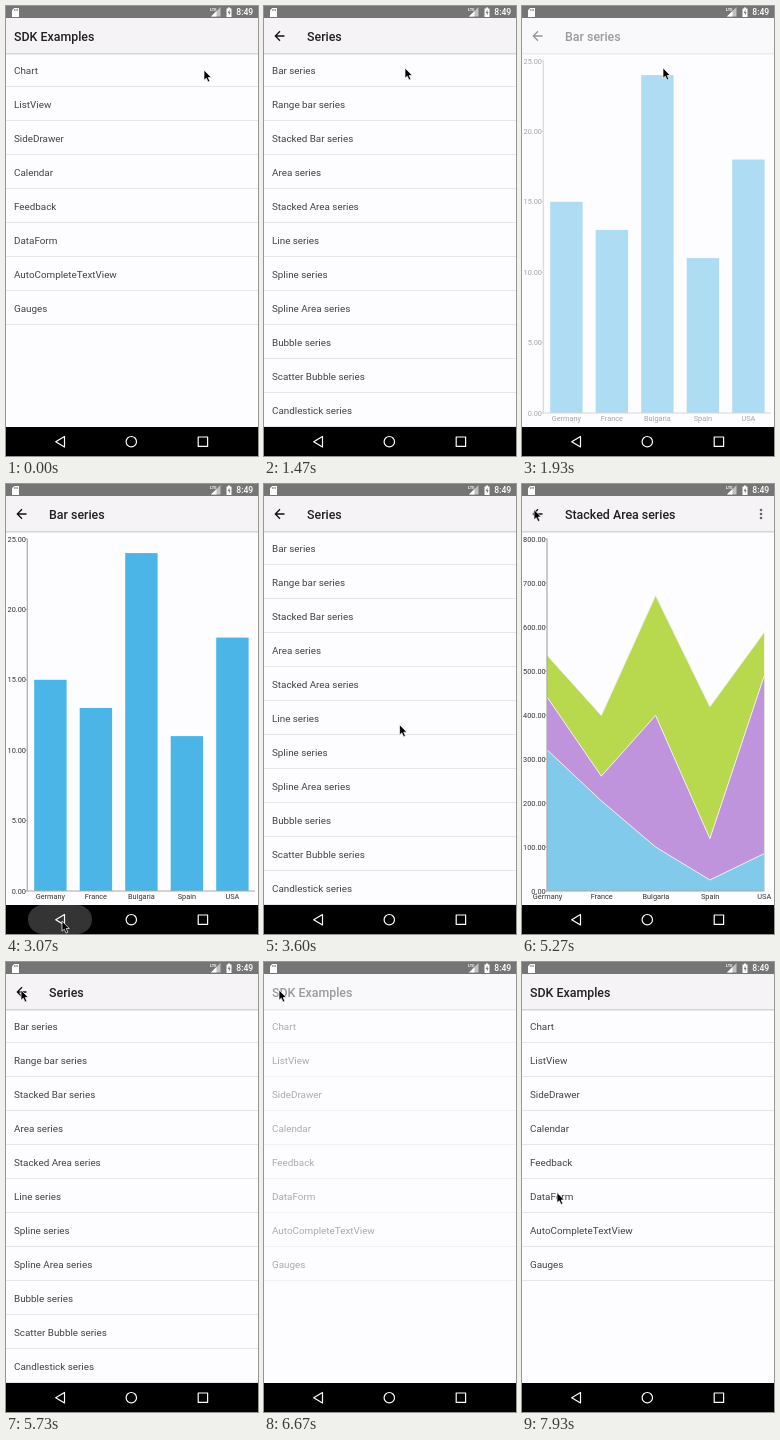
An HTML page for the animation above (8 s loop, 252 by 450 pixels).

```html
<!DOCTYPE html>
<html lang="en">
<head>
<meta charset="utf-8">
<title>SDK Examples</title>
<style>
  html, body { margin: 0; width: 100%; height: 100%; overflow: hidden; background: #fdfcfe; }
  svg { display: block; width: 252px; height: 450px; font-family: Roboto, sans-serif; }
  .title { font-size: 12.4px; font-weight: 500; fill: #212121; }
  .row { font-size: 9.85px; fill: #424242; }
  .label { font-size: 7.35px; fill: #333; }
  .clock { font-size: 8.6px; font-weight: 500; fill: #fff; }
</style>
</head>
<body>
<svg viewBox="0 0 252 450">
  <defs>
    <linearGradient id="shadow" x2="0" y2="1">
      <stop stop-color="#cbcacc"/><stop offset="1" stop-color="#fdfcfe"/>
    </linearGradient>
  </defs>
  <rect width="252" height="450" fill="#fdfcfe"/>
  <g id="pages"></g>

  <rect width="252" height="12" fill="#757575"/>
  <path d="M6 4.2L8.2 2H13V11H6Z" fill="#fff"/>
  <path d="M8.6 3v2M10 3v2M11.4 3v2" stroke="#757575" stroke-width=".7"/>
  <path d="M205 10.5H214.5V1Z" fill="#fff" opacity=".55"/>
  <path d="M205 10.5H210.5V5Z" fill="#fff"/>
  <text x="204" y="5" font-size="4" font-weight="700" fill="#fff">LTE</text>
  <path d="M220.500 2.500h1.500v-1h2v1h1.500v8.500h-5z" fill="#fff"/>
  <path d="M223.500 3.800l-1.800 3.200h1.200v2.500l1.700-3.300h-1.100z" fill="#757575"/>
  <text class="clock" x="230.300" y="9.200">8:49</text>

  <rect y="421" width="252" height="29"/>
  <rect id="ripple" x="22" y="421" width="64" height="29" rx="15" fill="#343434"/>
  <g fill="none" stroke="#fff" stroke-width="1.2" stroke-linejoin="round">
    <path d="M58.500 430.500V441L49.700 435.700Z"/>
    <circle cx="125.300" cy="435.700" r="5.200"/>
    <rect x="192.200" y="431" width="9.400" height="9.400"/>
  </g>
  <path id="cursor" d="M0 0V10.200L2.300 8.200L4 12L5.900 11.200L4.200 7.500H7.300Z" stroke="#fff" stroke-width=".7"/>
</svg>
<script>
const FRAME = 1000 / 15, FRAMES = 120;
const $ = id => document.getElementById(id);
const countries = ['Germany', 'France', 'Bulgaria', 'Spain', 'USA'];

const text = (cls, x, y, s, anchor = 'start') =>
  `<text class="${cls}" x="${x}" y="${y}" text-anchor="${anchor}">${s}</text>`;
const line = (d, color, width = 1) =>
  `<path d="${d}" fill="none" stroke="${color}" stroke-width="${width}"/>`;

const header = (title, back = true) =>
  '<rect y="12" width="252" height="35.5" fill="#f5f3f6"/>' +
  '<rect y="47" width="252" height="2.500" fill="url(#shadow)"/>' +
  text('title', back ? 43 : 8, 34.8, title) +
  (back ? line('M20.500 30H11.800M16 25.300L11.300 30L16 34.700', '#111', 1.3) : '');

const list = (title, rows, back) => header(title, back) + rows.map((row, i) =>
  text('row', 8, 67.7 + 34 * i, row) +
  line(`M0 ${80.5 + 34 * i}H252`, '#e6e5e7')).join('');

// Value axis with evenly spaced labels, and category labels below
function axes(left, right, max, step, firstX, stepX) {
  let out = line(`M${left} 54.500V407H${right}`, '#aaa', 1.2);
  for (let v = 0; v <= max; v += step) {
    const y = 407 - 352 * v / max;
    out += line(`M${left - 2} ${y}H${left}`, '#aaa') +
      text('label', left - 1.3, y + 2.6, v.toFixed(2), 'end');
  }
  return out + countries.map((c, i) =>
    text('label', firstX + i * stepX, 414.6, c, 'middle')).join('');
}

function barChart() {
  const bars = [15, 13, 24, 11, 18].map((v, i) =>
    `<rect x="${28.2 + 45.5 * i}" y="${407 - v * 14.08}" width="32.400" height="${v * 14.08}" fill="#4bb5e7"/>`);
  return header('Bar series') + bars.join('') + axes(21.3, 249, 25, 5, 44.4, 45.5);
}

function areaChart() {
  const layers = [
    ['#b8d84d', [536, 399, 672, 419, 588]],
    ['#c093dd', [441, 261, 399, 119, 489]],
    ['#82caec', [321, 205, 100, 25, 85]]
  ];
  const areas = layers.map(([color, values]) => {
    const top = values.map((v, i) => `${25 + 54.3 * i} ${407 - v * 0.44}`).join('L');
    return `<path d="M${top}V407H25Z" fill="${color}"/>` + line('M' + top, '#f4f1f6');
  });
  const dots = [26, 30, 34].map(y => `<circle cx="239" cy="${y}" r="1.300" fill="#666"/>`);
  return header('Stacked Area series') + dots.join('') + areas.join('') +
    axes(25, 242.5, 800, 100, 25.5, 54.2);
}

const pages = {
  home: list('SDK Examples', ['Chart', 'ListView', 'SideDrawer', 'Calendar', 'Feedback',
    'DataForm', 'AutoCompleteTextView', 'Gauges'], false),
  chart: list('Chart', ['Series', 'Axes', 'Interaction', 'Annotations', 'Legend', 'Grid', 'Styling']),
  series: list('Series', ['Bar', 'Range bar', 'Stacked Bar', 'Area', 'Stacked Area', 'Line', 'Spline',
    'Spline Area', 'Bubble', 'Scatter Bubble', 'Candlestick'].map(s => s + ' series')),
  bar: barChart(),
  area: areaChart()
};
$('pages').innerHTML = Object.entries(pages).map(([id, body]) => `<g id="${id}">${body}</g>`).join('');

// Navigation: [step, page shown from then on]
const visits = [[-9, 'home'], [6, 'chart'], [19, 'series'], [28, 'bar'], [47, 'series'],
  [62, 'area'], [83, 'series'], [91, 'chart'], [99, 'home']];
const fadeIn = [0, 0.44, 0.84, 1];

// Pointer stops: [step, x, y]
const stops = [[0, 198, 64], [1, 194, 65], [5, 194, 65], [10, 152, 62], [12, 152, 62], [15, 152, 55],
  [17, 152, 55], [22, 141, 62], [38, 141, 62], [45, 56, 437], [47, 56, 437], [51, 134, 270],
  [58, 138, 195.5], [65, 138, 195.5], [79, 12, 25.5], [82, 12, 25.5], [86, 15, 28], [104, 15, 28],
  [108, 73, 150], [112, 35, 234], [118, 35, 234], [119, 35, 230.5], [120, 35, 230.5]];

function pointer(n) {
  const i = stops.findIndex(s => s[0] > n);
  const [n0, x0, y0] = stops[i - 1], [n1, x1, y1] = stops[i];
  const u = (n - n0) / (n1 - n0), e = u * u * (3 - 2 * u);
  return [x0 + (x1 - x0) * e, y0 + (y1 - y0) * e];
}

function draw(n) {
  const i = visits.findLastIndex(v => v[0] <= n);
  const [start, page] = visits[i];
  const shown = fadeIn[Math.min(n - start, 3)];
  for (const id in pages) $(id).setAttribute('opacity', id === page ? shown : 0);
  if (n === start) $(visits[i - 1][1]).setAttribute('opacity', 0.5);

  const ripple = n < 45 ? 0 : n < 47 ? 1 : Math.max(0, 1 - (n - 46) / 4);
  $('ripple').setAttribute('opacity', ripple);
  $('cursor').setAttribute('transform', `translate(${pointer(n)})`);
}

const begin = performance.now();
function tick() {
  const t = Math.max(0, performance.now() - begin) % (FRAME * FRAMES);
  draw(Math.floor((t + 4) / FRAME) % FRAMES);
  requestAnimationFrame(tick);
}
tick();
</script>
</body>
</html>
```
